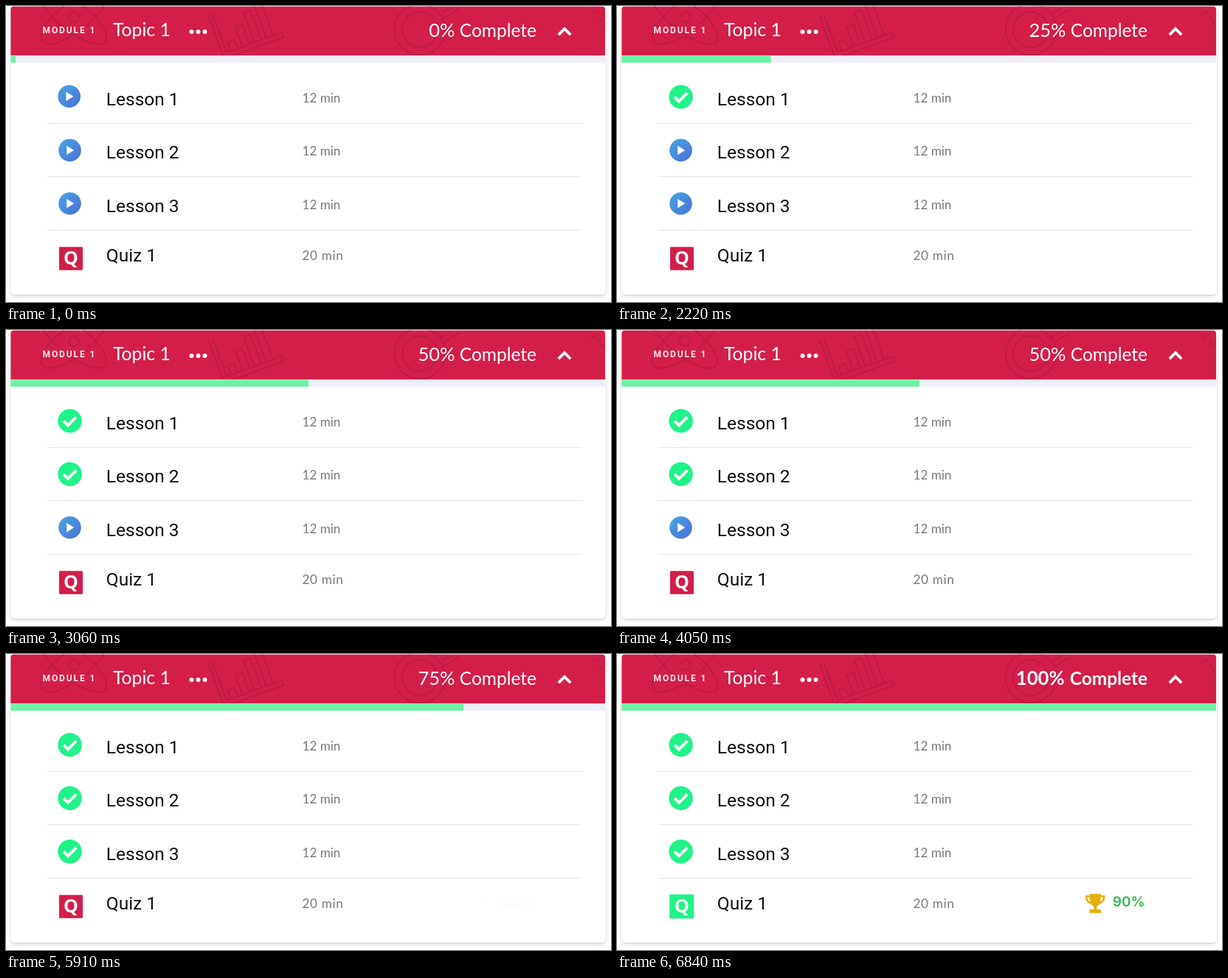
Animation of 820 by 402 pixels, one loop 8000 ms. Source, as an HTML page:

```html
<!DOCTYPE html>
<html lang="en">
<head>
<meta charset="utf-8">
<title>Module progress</title>
<style>
  html, body { margin: 0; width: 100%; height: 100%; overflow: hidden; background: #fff; }
  svg { display: block; width: 100vw; height: 100vh; }
  .head { font-family: Lato, sans-serif; fill: #fff; }
  .bold { font-weight: 700; }
  .name { font: 24.5px Roboto, sans-serif; fill: #111; }
  .time { font: 17.1px Lato, sans-serif; fill: #797979; }
  .deco { fill: none; stroke: #bd1a42; stroke-width: 1.8; }
  .q { font: 700 25px "Open Sans", sans-serif; fill: #fff; text-anchor: middle; }
</style>
</head>
<body>
<svg viewBox="0 0 820 402" preserveAspectRatio="none">
  <defs>
    <linearGradient id="blue" x1="0" y1="0" x2="1" y2="1">
      <stop offset="0" stop-color="#48a5e2"/><stop offset="1" stop-color="#4b70d6"/>
    </linearGradient>
    <filter id="shade" x="-5%" y="-5%" width="110%" height="110%">
      <feDropShadow dx="0" dy="1.5" stdDeviation="2" flood-color="#000" flood-opacity=".22"/>
    </filter>
    <clipPath id="top"><path d="M6.4 67.4V5Q6.4 .8 10.4 .8H808Q812 .8 812 5V67.4Z"/></clipPath>
    <g id="play">
      <circle r="15.3" fill="url(#blue)"/>
      <path d="M-4.3-6.2L5.7 0L-4.3 6.2Z" fill="#fff"/>
    </g>
    <g id="check">
      <circle r="16.2" fill="#20f389"/>
      <path d="M-8.6 .2L-2.6 6L8.6-5.2" fill="none" stroke="#fff" stroke-width="4"/>
    </g>
  </defs>

  <rect x="6.5" y=".8" width="806" height="391.2" rx="6" fill="#fff" filter="url(#shade)"/>
  <g clip-path="url(#top)">
    <rect x="6" width="807" height="68" fill="#d31e4a"/>
    <g class="deco">
      <g transform="translate(92 15)">
        <ellipse rx="54" ry="20" transform="rotate(-38)"/>
        <ellipse rx="54" ry="20" transform="rotate(38)"/>
        <circle r="7"/>
      </g>
      <g transform="translate(292 73) rotate(-20)">
        <path d="M4-62V0H90V-7H10V-62M16-7V-20H26V-7M33-7V-35H43V-7M50-7V-50H60V-7M67-7V-62H77V-7"/>
      </g>
      <circle cx="561" cy="32" r="34.5"/>
      <circle cx="561" cy="32" r="24"/>
      <path d="M588 10L604 2M594 16L614 4M793 12L802 6M804 14L809 23"/>
    </g>
  </g>

  <text class="head" x="49.5" y="37" style="font:700 12px Roboto,sans-serif;letter-spacing:1.9px" fill-opacity=".9">MODULE 1</text>
  <text class="head" x="145" y="41" font-size="24.7">Topic 1</text>
  <g fill="#fff"><circle cx="251.5" cy="35" r="3"/><circle cx="260.5" cy="35" r="3"/><circle cx="269.5" cy="35" r="3"/></g>
  <path d="M748.8 39.2L757 31L765.2 39.2" fill="none" stroke="#fff" stroke-width="3.8"/>
  <g id="percent"></g>

  <rect x="6.4" y="67.4" width="805.6" height="9.6" fill="#efeef8"/>
  <rect id="bar" x="6.4" y="67.4" width="6" height="9.6" fill="#6ff2a6"/>

  <path d="M56 159.5H780M56 231.5H780M56 304.5H780" stroke="#e7e7e7"/>
  <g id="rows"></g>

  <g id="quiz">
    <rect x="72" y="327.3" width="32" height="31.5" rx="1" fill="#d31e4a"/>
    <rect id="passed" x="71.2" y="326.4" width="33" height="32.8" rx="1" fill="#20f389"/>
    <text class="q" x="88" y="350.5">Q</text>
  </g>
  <g id="cup" fill="#e6b010" stroke="none">
    <path d="M-8-13H8C8-4 6 3 2 4V8H5Q8 8 8 11V13H-8V11Q-8 8-5 8H-2V4C-6 3-8-4-8-13Z"/>
    <path d="M-8-9.7H-12C-12-4-9-1-5 0M8-9.7H12C12-4 9-1 5 0" fill="none" stroke="#e6b010" stroke-width="2.6"/>
  </g>
  <text id="score" x="671.8" y="343" font-family="Inter, sans-serif" font-weight="600" font-size="19" fill="#30b94d">90%</text>
</svg>

<script>
const NS = "http://www.w3.org/2000/svg";
const LOOP = 8000, SPAN = 900;
const STARTS = [400, 2220, 4080, 5915];
const EDGES = [13, 208, 410, 620, 812];

const $ = id => document.getElementById(id);

function add(parent, tag, attrs, text) {
  const el = document.createElementNS(NS, tag);
  for (const k in attrs) el.setAttribute(k, attrs[k]);
  if (text) el.textContent = text;
  parent.appendChild(el);
  return el;
}

const fade = (el, a) => el.setAttribute("opacity", a.toFixed(3));

function headText(text, x, size, bold) {
  return add($("percent"), "text", {
    class: bold ? "head bold" : "head", x, y: 42, "font-size": size, "text-anchor": "end"
  }, text);
}

const digits = [0, 25, 50, 75, 100].map(n =>
  headText(n + "%", n === 100 ? 606.5 : 608.5, n === 100 ? 25.7 : 25.5, n === 100));
const label = headText("Complete", 719, 24.5, false);
const boldLabel = headText("Complete", 719, 24.4, true);

const plays = [], checks = [];
for (let i = 0; i < 4; i++) {
  const rows = $("rows"), dy = i * 72.4, quiz = i === 3;
  add(rows, "text", { class: "name", x: 135.8, y: quiz ? 347 : 135 + dy },
    quiz ? "Quiz 1" : "Lesson " + (i + 1));
  add(rows, "text", { class: "time", x: 401.5, y: quiz ? 345 : 130.8 + dy,
    "letter-spacing": quiz ? .7 : 0 }, quiz ? "20 min" : "12 min");
  if (quiz) break;
  const x = i ? 86.5 : 85.7, y = i ? 123.5 + dy : 122.7;
  plays.push(add(rows, "use", { href: "#play", transform: `translate(${x} ${y})` }));
  checks.push(add(rows, "use", { href: "#check", transform: `translate(86.6 ${123.4 + dy})` }));
}

const easeOut = u => 1 - (1 - u) ** 3;
const progress = (t, start) => easeOut(Math.min(1, Math.max(0, (t - start) / SPAN)));

function draw(t) {
  const p = STARTS.map(s => progress(t, s));
  const edge = p.reduce((x, v, i) => x + v * (EDGES[i + 1] - EDGES[i]), EDGES[0]);
  $("bar").setAttribute("width", (edge - 6.4).toFixed(2));

  digits.forEach((el, i) => fade(el, (i ? p[i - 1] : 1) * (1 - (p[i] || 0))));
  fade(label, 1 - p[3]);
  fade(boldLabel, p[3]);

  checks.forEach((el, i) => {
    fade(el, p[i]);
    fade(plays[i], p[i] < 1 ? 1 : 0);
  });
  fade($("passed"), p[3]);

  // The score tints briefly with the third lesson, then grows in with the quiz.
  const hint = p[2] * (1 - p[2]) + .03 * p[2];
  fade($("score"), hint + (1 - hint) * p[3]);
  const glow = Math.min(1, 5 * hint);
  fade($("cup"), glow + (1 - glow) * p[3]);
  const size = .12 + .88 * p[3];
  $("cup").setAttribute("transform", `translate(648.2 338.8) scale(${size.toFixed(3)})`);
}

const begin = performance.now();
function tick() {
  draw((performance.now() - begin) % LOOP);
  requestAnimationFrame(tick);
}
tick();
</script>
</body>
</html>
```
